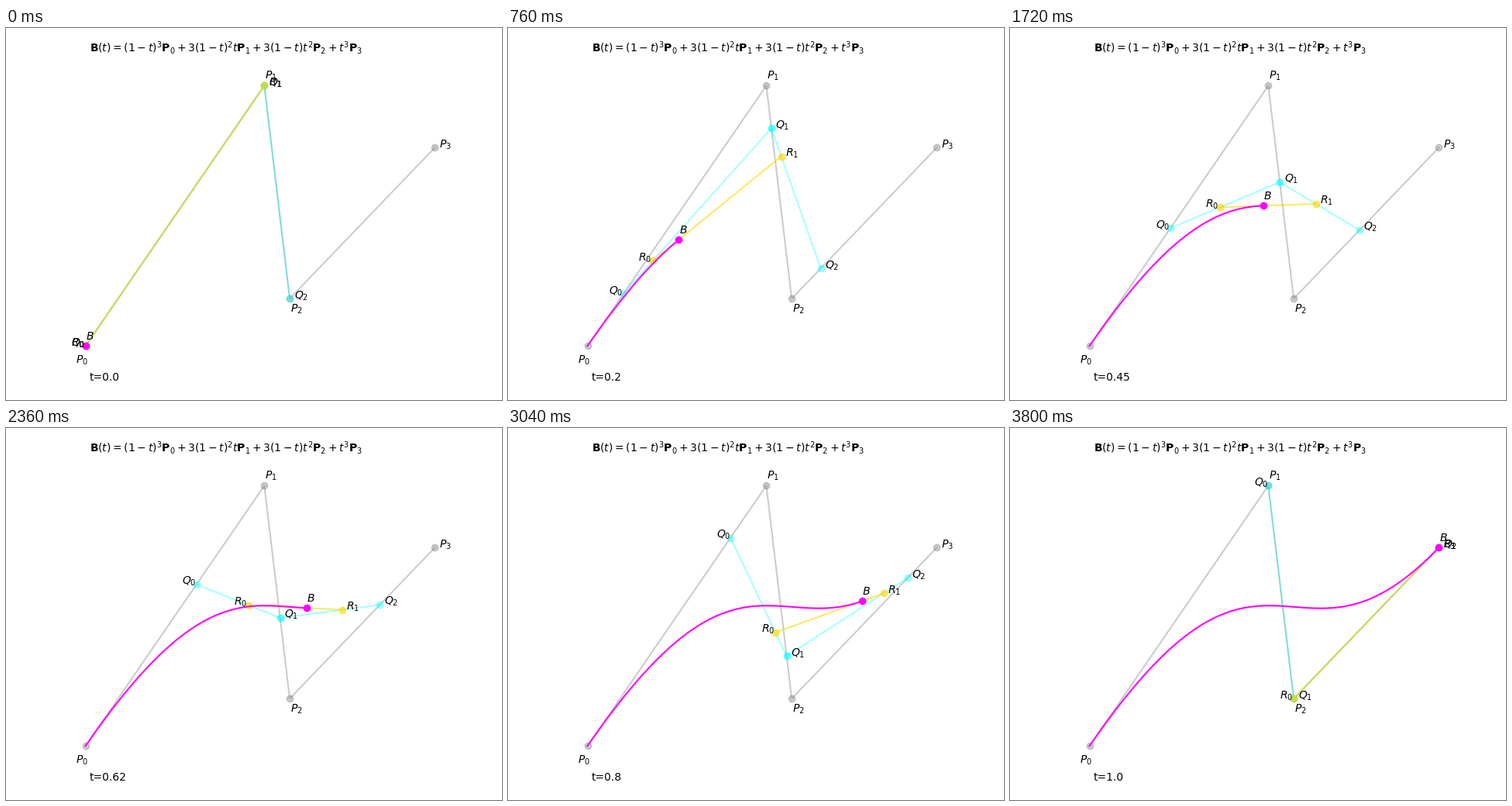
These frames come from a looping animation (640 by 480 pixels, 3.84 s). A matplotlib script:

```python
import numpy as np
import matplotlib.pyplot as plt
from matplotlib.animation import FuncAnimation

W, H, DPI = 640, 480, 100
FRAMES, INTERVAL = 96, 40

# Control points in stage pixels, y pointing down
P = np.array([(102.55, 410.4), (333.3, 74.4), (366.1, 349.2), (553.45, 154.2)])

FORMULA = (r"$\mathbf{B}(t)=(1-t)^3\mathbf{P}_0+3(1-t)^2t\mathbf{P}_1"
           r"+3(1-t)t^2\mathbf{P}_2+t^3\mathbf{P}_3$")
LEFT, RIGHT, ABOVE = (-18.5, 0), (5.5, 0), (0.5, -8.4)

plt.rcParams["font.family"] = "DejaVu Sans"
fig = plt.figure(figsize=(W / DPI, H / DPI), dpi=DPI, facecolor="white")
ax = fig.add_axes([0, 0, 1, 1])
ax.set_xlim(0, W)
ax.set_ylim(H, 0)
ax.axis("off")


def reduce_points(pts, t):
    """One de Casteljau step."""
    return (1 - t) * pts[:-1] + t * pts[1:]


def bezier(t):
    pts = P
    while len(pts) > 1:
        pts = reduce_points(pts, t)
    return pts[0]


def polyline(color, alpha=1.0, marker="o"):
    return ax.plot([], [], color=color, alpha=alpha, marker=marker,
                   lw=1.5, ms=6)[0]


def label(text, point=(0, 0), offset=(0, 0)):
    return ax.text(point[0] + offset[0], point[1] + offset[1], text, fontsize=10)


times = np.linspace(0, 1, FRAMES)
path = np.array([bezier(t) for t in times])

frame_line = polyline("gray", 0.4)
frame_line.set_data(*P.T)
q_lines = [polyline("cyan", 0.35) for _ in range(2)]
r_line = polyline("gold", 0.6)
curve = polyline("magenta", marker="")
dot = polyline("magenta")

for i, offset in enumerate([(-13, 22.4), ABOVE, (0.5, 17.4), RIGHT]):
    label(f"$P_{i}$", P[i], offset)
label(FORMULA, (107.5, 30.5))
clock = label("", (107.5, 455.3))

offsets = [LEFT, RIGHT, RIGHT, LEFT, RIGHT, ABOVE]
names = ["Q_0", "Q_1", "Q_2", "R_0", "R_1", "B"]
moving = [label(f"${name}$") for name in names]


def update(n):
    t = times[n]
    q = reduce_points(P, t)
    r = reduce_points(q, t)
    b = path[n]

    for i, line in enumerate(q_lines):
        line.set_data(*q[i:i + 2].T)
    r_line.set_data(*r.T)
    curve.set_data(*path[:n + 1].T)
    dot.set_data([b[0]], [b[1]])

    for text, point, offset in zip(moving, [*q, *r, b], offsets):
        text.set_position(point + np.array(offset))
    clock.set_text(f"t={round(float(t), 2)}")
    return [*q_lines, r_line, curve, dot, clock, *moving]


anim = FuncAnimation(fig, update, frames=FRAMES, interval=INTERVAL,
                     init_func=lambda: update(0), repeat=True)
plt.show()
```
